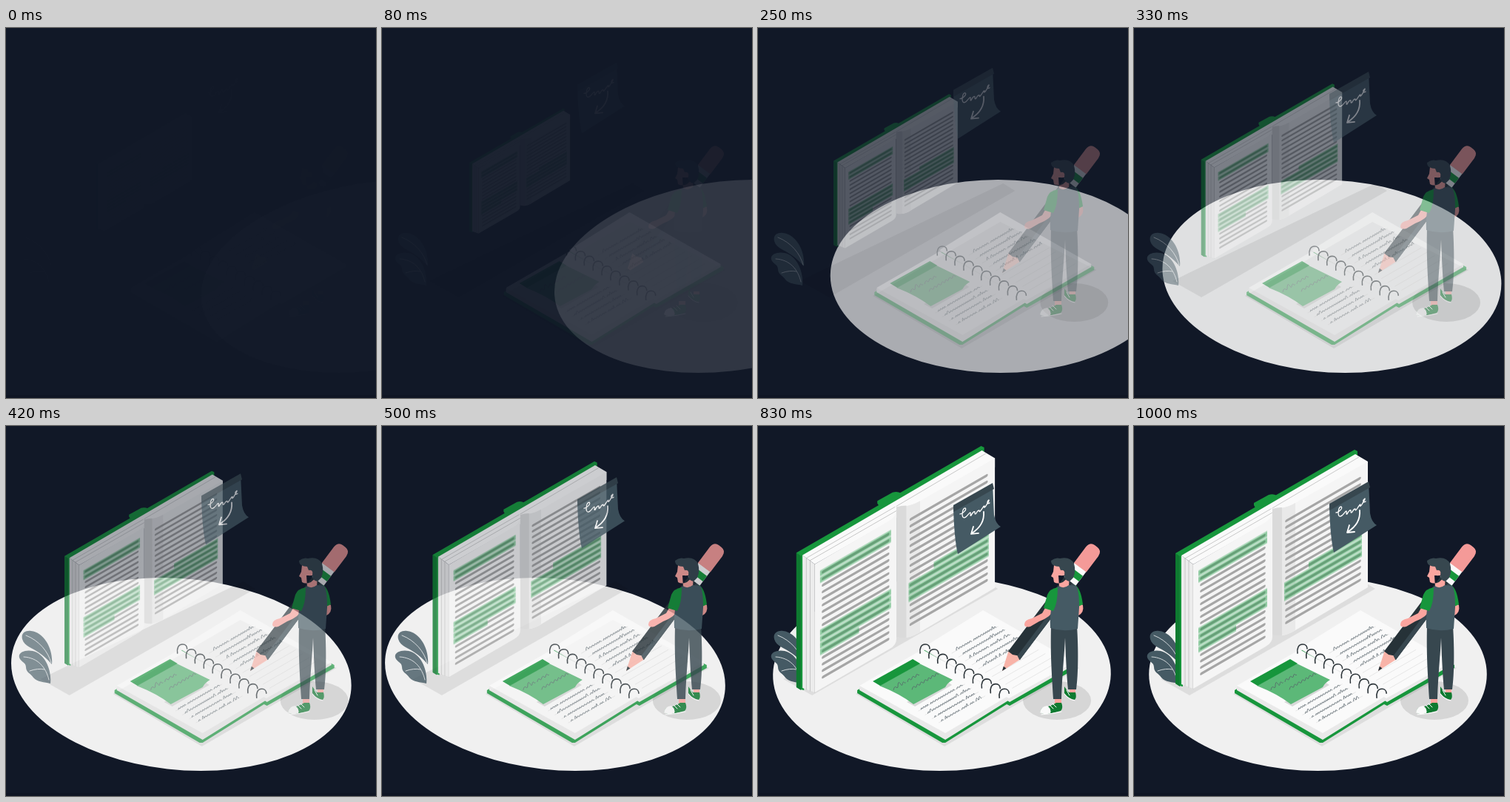
Animation of 500 by 500 pixels, one loop 1040 ms. Source, as an HTML page:

```html
<!DOCTYPE html>
<html lang="en">
<head>
<meta charset="utf-8">
<title>Books and pencil</title>
<style>
  html, body { margin: 0; width: 100%; height: 100%; overflow: hidden; background: #111827; }
  svg { display: block; width: 100vw; height: 100vh; }
  path, g { stroke-linejoin: round; }
  .line { fill: none; stroke-linecap: round; }
  .green { fill: #17963c; }
  .deep { fill: #0e7a30; }
  .slate { fill: #455a64; }
  .dark { fill: #37474f; }
  .ink { fill: #263238; }
  .skin { fill: #fba59f; }
  .page { fill: #f5f5f5; }
  .white { fill: #fafafa; }
  .mark { fill: none; stroke: #17963c; opacity: .25; }
</style>
</head>
<body>
<svg viewBox="0 0 500 500">
  <rect y="496" width="500" height="4" fill="#0f1523"/>
  <ellipse id="floor" rx="228.300" ry="130.500" fill="#f0f0f0"/>

  <g id="shadows">
    <path opacity=".08" d="M36 342L60 330L310 210L326 220L75 364Z"/>
    <path opacity=".08" d="M134 362L306 262L436 327L254 433Z"/>
    <ellipse opacity=".11" cx="406" cy="371" rx="46" ry="26"/>
  </g>

  <g id="plant">
    <path class="slate" d="M62 322C64 302 52 279 34 277C26 276 20 280 22 288C25 298 36 300 44 306C52 311 57 317 62 322Z"/>
    <path class="slate" d="M60 348C62 332 54 308 36 304C26 302 16 306 18 313C20 319 27 319 27 326C27 333 33 334 37 340C42 346 52 346 60 348Z"/>
    <path class="line" stroke="#dfe4e6" stroke-width=".9" d="M27 283C45 290 57 305 61 320M24 312C43 313 54 326 58 343M32 331Q43 327 52 329"/>
  </g>

  <g id="book">
    <path class="green" d="M162 107V104L182 93Q188 91 193 94V100L166 114Z"/>
    <path class="green" d="M56 172L298 32L302 34V44L66 180V352L61 351L56 348Z"/>
    <path class="deep" d="M56 172L62 176V352L56 348Z"/>
    <path class="white" d="M64 175L299 38L316 48V60L218 116L187 126L80 187Z"/>
    <path fill="#ececec" d="M64 175L80 187V355L64 349Z"/>
    <path class="line" stroke="#bdbdbd" stroke-width=".8" d="M69 179V351M74 182V353M80 187V355M69 179L185 112M74 182L187 117M187 111L304 42"/>
    <path class="page" d="M80 187L176 131Q187 125 187 116V285Q187 293 178 298L80 355Z"/>
    <path class="page" d="M200 111Q210 109 218 104L316 48V218L218 276Q208 282 200 283Z"/>
    <path fill="#e9e9e9" d="M196 111Q208 110 218 104V276Q208 283 196 283Z"/>
    <path fill="#dadada" d="M187 112Q193 110 200 110V283Q193 284 187 282Z"/>
    <g id="leftText" transform="matrix(1 -.577 0 1 91 197)"/>
    <g id="rightText" transform="matrix(1 -.577 0 1 206 128)"/>
  </g>

  <g id="note">
    <path class="slate" d="M264 107L317 76L319 118Q321 130 328 134L270 171Q265 150 264 107Z"/>
    <path class="dark" d="M264 105L317 75L319 83L264.500 114Z"/>
    <path class="line" stroke="#fff" stroke-width="1.300" d="M273 117C276 117 283 111 280 109C276 109 274 123 279 122C283 121 285 115 287 115C288 117 286 120 288 119C290 115 292 113 293 114C293 117 293 118 295 116C297 112 298 112 299 112C299 115 300 114 302 111C304 108 305 106 306 106C305 109 306 109 308 106C310 102 313 99 312 98C309 100 309 105 313 102"/>
    <path class="line" stroke="#fff" stroke-width="1.800" d="M305 114C306 126 300 136 289 143M291 134L288 144L298 143"/>
  </g>

  <g id="notebook">
    <path class="green" d="M136 357L306 256L433 323V327L342 378L338 376L255 428H251L136 361Z"/>
    <path fill="#e9e9e9" d="M139 352L224 303L340 366V371L255 424L139 357ZM224 301L429 319V323L342 373Z"/>
    <path class="white" d="M139 351L224 302L338 366L255 415ZM224 300L306 249L429 319L341 368Z"/>
    <path id="rules" class="line" stroke="#dedede" stroke-width=".7"/>
    <path fill="#d9d9d9" d="M203 373L214 379L264 350L255 344Z"/>
    <path fill="#5cb878" d="M166 351L220 321L265 343Q258 347 255 353L212 376Q194 362 166 351Z"/>
    <path class="green" d="M157 345L211 315L221 321L167 351Z"/>
    <g id="writing" class="line" stroke="#56636a" stroke-width=".8"/>
    <g id="rings" class="line" stroke="#2b3338" stroke-width="1.600"/>
  </g>

  <g id="person">
    <g transform="translate(330 331) rotate(-53)">
      <path fill="#f8b3a8" d="M0 0L27-9.500L31-4L28 2L31 9.500L27 10Z"/>
      <path class="ink" d="M0 0L6-2.300V2.300ZM26-9.500H154V10H26L29 4L26-2Z"/>
      <path class="dark" d="M29 4H154V10H26Z"/>
      <rect class="white" x="152" y="-10" width="24" height="20"/>
      <rect class="green" x="159" y="-10" width="9" height="20"/>
      <path fill="#f49a98" d="M175-10.500H202Q211-10 211-2V2Q211 10 202 10.500H175Z"/>
    </g>
    <path class="skin" d="M430 236L439 242Q441 252 433 256L428 254Z"/>
    <path class="green" d="M428 215Q436 218 439 241L431 245L424 230Z"/>
    <path class="skin" d="M401 366H410V377H401ZM421 353H429V363H421Z"/>
    <path class="dark" d="M396 270C395 310 397 335 399 369H410C411 335 414 310 415 286C416 315 417 335 419 356H430C433 335 433 300 431 270Z"/>
    <path class="deep" d="M403 374H410Q413 381 409 385C400 387 392 390 385 389Q379 386 384 381Q396 379 403 374ZM414 352Q418 358 420 360L429 360Q431 367 428 370Q420 369 414 361Z"/>
    <path class="white" d="M381 387Q382 379 391 378Q397 383 395 388Q386 391 381 387Z"/>
    <path class="line" stroke="#fff" stroke-width="1" d="M394 377L399 382M398 375L403 380M383 390Q398 389 410 386M414 362Q420 370 428 371M417 357L421 364"/>
    <path class="skin" d="M388 246L399 249Q396 258 380 264L368 271Q360 273 360 268Q360 262 370 260L384 253Z"/>
    <path class="skin" d="M406 202H421L420 217Q413 222 407 217ZM400 188L399 197L396 203L399 205L400 211Q405 214 412 211L420 204L418 188Z"/>
    <path class="slate" d="M403 219Q407 215 408 217Q414 220 420 215L430 216Q434 222 434 245L432 274Q413 279 395 273C394 250 398 235 403 219Z"/>
    <path class="green" d="M405 218Q394 220 391 228L386 246L399 250Q405 240 405 218Z"/>
    <path class="dark" d="M396 182Q402 177 408 179Q422 176 427 186Q430 196 426 205L421 210Q415 209 414 203Q415 196 409 195L407 190Q402 190 399 188Q396 186 396 182Z"/>
    <circle class="skin" cx="410.500" cy="198.500" r="3.800"/>
  </g>
</svg>
<script>
const LOOP = 1040, FPS = 24, LEAD = 1 / 30, ROW = 8.6;
const el = id => document.getElementById(id);
const repeat = (n, f) => Array.from({ length: n }, (_, i) => f(i)).join('');

let seed = 7;
const random = () => (seed = seed * 16807 % 2147483647) / 2147483647;

// Printed rows; each mark is [row, from, to], a highlighter stroke with soft edges.
function printed(id, width, marks) {
  const strokes = marks.map(([row, from, to]) => `M${from} ${row * ROW}H${to}`).join('');
  el(id).innerHTML =
    `<path class="line" stroke="#a6a6a6" stroke-width="3.6" d="${repeat(17, i => `M0 ${i * ROW}h${width}`)}"/>` +
    [ROW, 6].map(w => `<path class="mark" stroke-width="${w}" d="${strokes}"/>`).join('');
}

// Point on the notebook: a runs along the writing, b down the page.
const onPage = (a, b) => [224 + .866 * (a + b), 302 + .5 * (b - a)];

// One line of loose handwriting.
function scrawl(a, b, length, size = 1) {
  let d = 'M0 0', x = 0;
  while (x < length) {
    const h = size * (random() < .15 ? 7 : 3.4), w = size * (1 + random() * .8);
    d += `q${w} ${-h} ${1.6 * w} ${-h * .4}t${w} ${h * .4}`;
    x += 2.6 * w;
    if (random() < .1) { d += 'm3 0'; x += 3; }
  }
  return `<path transform="matrix(.866 -.5 .2 .8 ${onPage(a, b)})" d="${d}"/>`;
}

printed('leftText', 85, [[0, -4, 89], [1, -4, 89], [9, -4, 89], [10, -4, 89], [11, -4, 89], [12, -4, 47]]);
printed('rightText', 99, [[9, 30, 102], [10, -3, 102], [11, -3, 102], [12, -3, 102]]);
el('rules').setAttribute('d',
  repeat(10, i => `M${onPage(18, 28 + i * 10.5)}L${onPage(90, 28 + i * 10.5)}`) +
  repeat(4, i => `M${onPage(-86, 80 + i * 10.6)}L${onPage(-14, 80 + i * 10.6)}`));
el('writing').innerHTML =
  repeat(5, i => scrawl(25.5, 27.5 + i * 10.5, 62)) +
  repeat(4, i => scrawl(-82, 80 + i * 10.6, 62)) +
  scrawl(-77, 32, 36, 1.5) + scrawl(-62, 46, 38, 1.5);
el('rings').innerHTML = repeat(10, i =>
  `<path transform="translate(${i * 11.9} ${i * 6.7})" d="M221 307C220 301 222 295 228 295C232 295 234 298 234 301"/>`);

// cubic-bezier(.36, -.01, .5, 1.38)
function spring(x) {
  if (x >= 1) return 1;
  const curve = (s, p, q) => 3 * p * s * (1 - s) ** 2 + 3 * q * s * s * (1 - s) + s ** 3;
  let lo = 0, hi = 1;
  for (let i = 0; i < 24; i++) {
    const mid = (lo + hi) / 2;
    if (curve(mid, .36, .5) < x) lo = mid; else hi = mid;
  }
  return curve(lo, -.01, 1.38);
}

function pose(id, opacity, transform) {
  el(id).setAttribute('opacity', Math.min(1, Math.max(0, opacity)));
  if (transform) el(id).setAttribute('transform', transform);
}

function draw(ms) {
  const step = Math.floor(ms * FPS / 1000 + .1);
  const t = (step < 2 ? 0 : step / FPS) + LEAD;

  const enter = spring(t / .6);
  const skew = t < .6 ? -20 + 30 * enter
    : t < .8 ? 10 - 12 * spring((t - .6) / .2)
    : -2 + 2 * spring((t - .8) / .2);
  pose('floor', enter, `translate(${248.5 + 250 * (1 - enter)} 335.5) skewX(${skew})`);

  const p = spring(t), slide = 30 * (1 - p);
  pose('shadows', enter, `translate(${slide} 0)`);
  pose('notebook', p, `translate(${slide} 0)`);
  pose('note', p, `translate(0 ${-slide})`);
  pose('book', p, `translate(186 193) scale(${.5 + p / 2}) translate(-186 -193)`);
  pose('plant', p);
  pose('person', p);
}

const start = performance.now();
(function tick() {
  draw((performance.now() - start) % LOOP);
  requestAnimationFrame(tick);
})();
</script>
</body>
</html>
```
